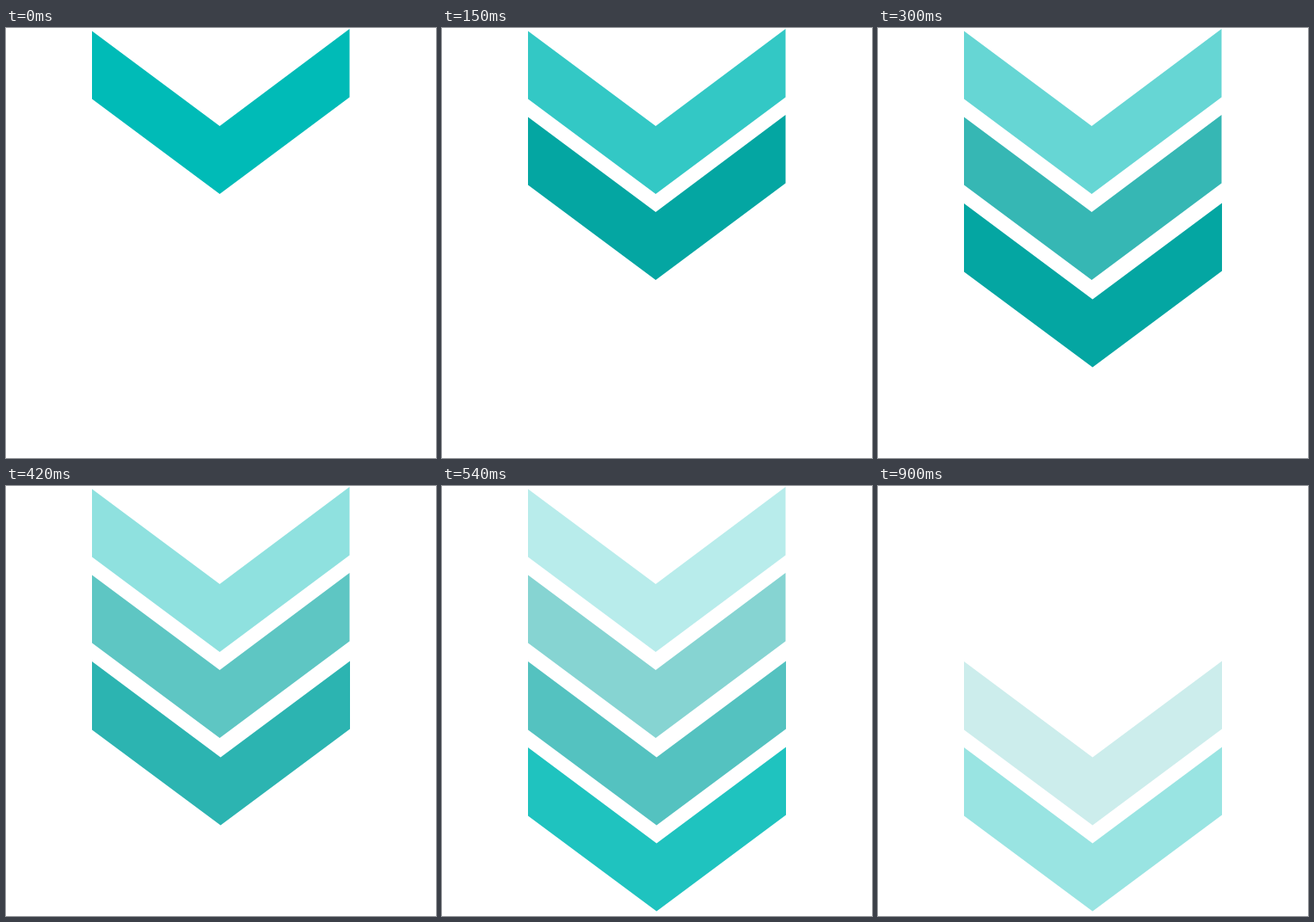
An HTML page for the animation above (930 ms loop, 500 px wide and 500 px high).

```html
<!DOCTYPE html>
<html lang="en">
<head>
<meta charset="utf-8">
<title>Falling chevrons</title>
<style>
  html, body { margin: 0; width: 100%; height: 100%; overflow: hidden; background: #fff; }
  svg { display: block; width: 500px; height: 500px; }
</style>
</head>
<body>
<svg viewBox="0 0 500 500">
  <defs>
    <path id="upper" d="M100 3.5L248.5 114L399.5 1V80.5L248.5 193L100 82.5Z"/>
    <path id="lower" d="M100 4L249.5 115.5L400 3.5V82.5L249.5 394.5L249.5 194.5L100 83.5Z"/>
    <path id="lowerBand" d="M100 4L249.5 115.5L400 3.5V82.5L249.5 194.5L100 83.5Z"/>
  </defs>
  <use class="chevron" href="#upper" fill="#00bbb7"/>
  <use class="chevron" href="#upper" y="100" fill="#04a6a2"/>
  <use class="chevron" href="#lowerBand" y="200" fill="#04a6a2"/>
  <use class="chevron" href="#lowerBand" y="300" fill="#00bbb7"/>
</svg>
<script>
  const LOOP = 930, STEP = 30, DELAY = 150, FADE = 750;
  const chevrons = document.querySelectorAll('.chevron');

  function draw() {
    const time = Math.floor(performance.now() % LOOP / STEP) * STEP;
    chevrons.forEach((chevron, i) => {
      const age = time - i * DELAY;
      chevron.style.opacity = age < 0 ? 0 : Math.max(0, 1 - age / FADE);
    });
    requestAnimationFrame(draw);
  }
  draw();
</script>
</body>
</html>
```
